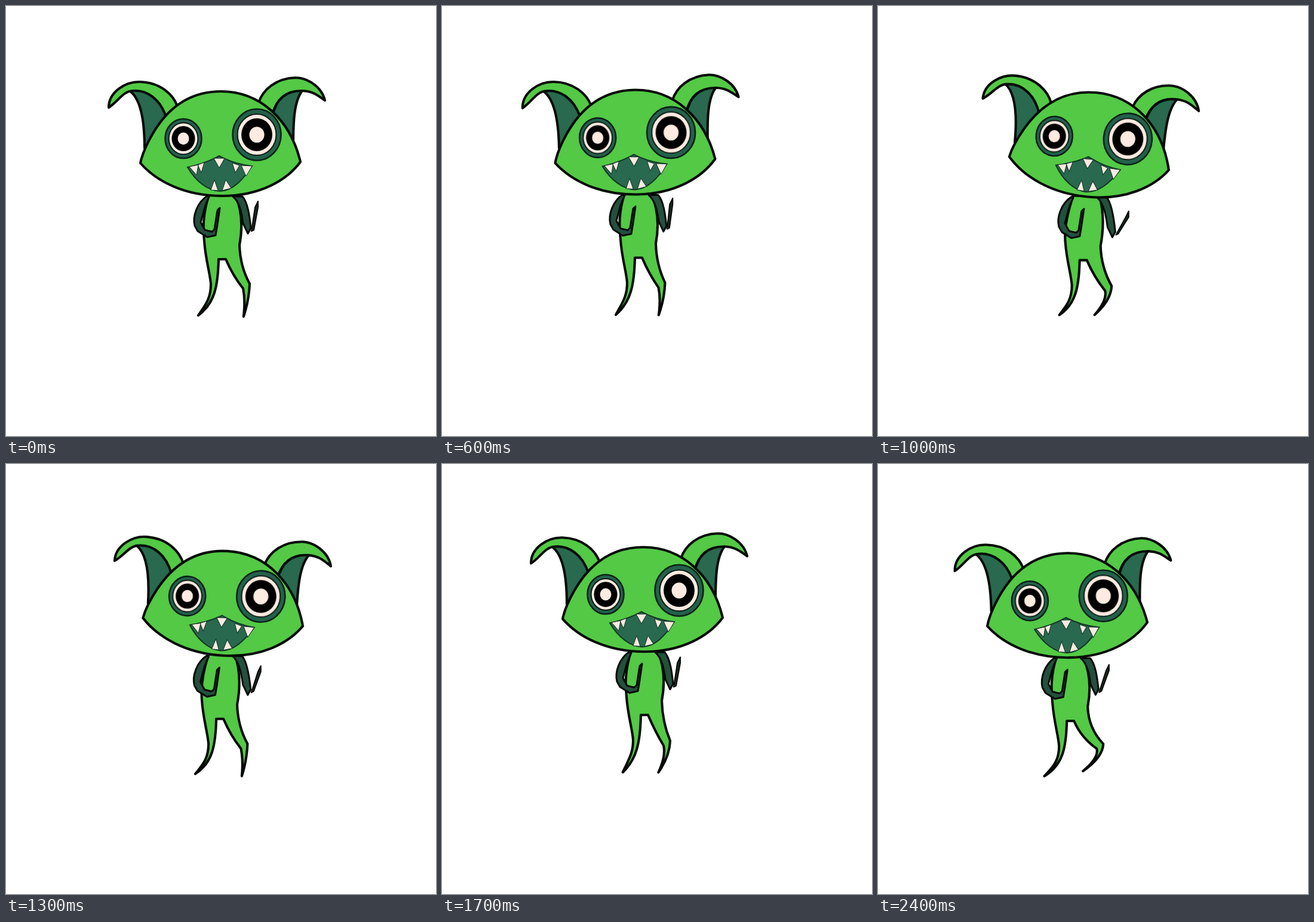
Recreate the animation shown at these times as an HTML page. Size 720 by 720 pixels, loop 2500 ms.

```html
<!DOCTYPE html>
<html>
<head>
<meta charset="utf-8">
<style>
  html, body { margin: 0; width: 100%; height: 100%; overflow: hidden; background: #fff; }
  svg { display: block; width: 100vw; height: 100vh; }
  .green { fill: #53c945; }
  .dark { fill: #28694f; }
  .arm { fill: #23503d; stroke-width: 3; }
  .pale { fill: #fdeae1; }
  .line { stroke: #060a07; stroke-width: 4.1; stroke-linejoin: round; }
</style>
</head>
<body>
<svg viewBox="0 0 720 720">
  <defs><filter id="soft"><feGaussianBlur stdDeviation="0.7"/></filter></defs>
  <g id="body" class="line">
    <path id="trunk" class="green"/>
    <path id="rightArm" class="arm"/>
    <path id="blade" fill="#1b2a20" stroke-width="2"/>
    <path id="leftArm" class="arm" d="M-25-106C-42-95-50-72-46-56L-41-47-25-37-11-40-8-58-4-86-8-82-13-50-17-46-29-49-36-62C-32-75-30-90-22-104Z"/>
  </g>
  <g id="head">
    <g class="line">
      <path class="dark" d="M207 142C224 154 232 188 232 238L272 190 262 165 225 136Z"/>
      <path class="green" d="M172 170C172 144 200 126 225 127C258 128 280 148 287 168L268 186C258 155 235 140 212 142C195 143 188 160 172 170Z"/>
      <path class="dark" d="M496 142C482 160 481 195 481 232L444 186 455 160 480 136Z"/>
      <path class="green" d="M534 158C528 133 502 120 485 120C452 121 430 140 423 162L446 182C452 158 467 141 497 142C515 143 522 150 534 158Z"/>
      <path class="green" d="M225 263C228 248 234 234 245 215C272 168 310 143 360 143C425 143 476 190 493 261C470 292 425 318 362 318C300 318 252 294 225 263Z"/>
    </g>
    <g id="eyes"></g>
    <path class="dark" stroke="#123526" stroke-width="2" d="M304 270Q333 264 357 251Q383 265 412 268C396 292 380 309 358 310C338 309 318 294 304 270Z"/>
    <path class="pale" stroke="#123526" stroke-width="1" d="M307 269L322 266 319 283ZM321 266L332 262 327 279ZM348 255L366 255 357 271ZM379 263L391 267 384 279ZM394 267L412 268 402 285ZM343 308L355 309 349 291ZM362 309L377 305 368 291Z"/>
  </g>
</svg>
<script>
const { sin, cos, min, max, exp, PI } = Math;
const el = id => document.getElementById(id);
const place = (id, value) => el(id).setAttribute('transform', value);
const shape = (id, d) => el(id).setAttribute('d', d);

function eye(x, y, rx, ry) {
  const ring = (k, attrs) => `<ellipse cx="${x}" cy="${y}" rx="${rx * k}" ry="${ry * k}" ${attrs}/>`;
  return ring(1, 'fill="#23614b" stroke="#0a2018" stroke-width="2.6"') + '<g filter="url(#soft)">' +
    ring(.8, 'class="pale" stroke="#0a1812" stroke-width="2"') +
    ring(.64, 'fill="#000"') + ring(.31, 'class="pale"') + '</g>';
}
el('eyes').innerHTML = eye(297, 222, 30.5, 33) + eye(420, 215.5, 40.5, 43);

function smooth(k, from, to) {
  const u = min(1, max(0, (k - from) / (to - from)));
  return u * u * (3 - 2 * u);
}

function draw(step) {
  // the sway repeats every 15 steps, a little further left each time
  const cycle = Math.floor(step / 15), k = step % 15;
  const a = 2 * PI * k / 15, s = sin(a);

  // slow tilt to the left, then a snap to the right that settles
  const tilt = k < 10 ? -1.1 * sin(PI * max(0, k - 2) / 10) : 5.2 * (1 - ((k - 10) / 5) ** 2);
  const lift = exp(-((k - 9) ** 2));
  const x = -12 * cycle - 5.5 * min(k, 7) + 35.5 * smooth(k, 7, 12.5) - 9 * smooth(k, 12.5, 15);
  const y = cycle + k / 15 - 6.5 * s - .9 * tilt;

  // limb ends, measured from the hip
  const left = [-40 + 5 * s + .8 * tilt, 94 + 2.5 * s];
  const right = [28.5 + 8 * cos(2 * a - 5.28) + 3 * cos(a), 96 - 12 * lift];
  const knee = [46 - 4 * s + 6 * lift - .8 * tilt, 41 + 3 * s + .9 * tilt];
  const elbow = [43 + 1.1 * tilt, -43 + .9 * tilt];
  const hand = [60 + 2.6 * tilt + 7 * lift, -97 + 2.5 * tilt + 5 * lift];
  const off = (p, dx, dy) => [p[0] + dx, p[1] + dy];

  place('head', `translate(${x + 3.2 * tilt} ${y}) rotate(${tilt} 358.5 218.5)`);
  place('body', `translate(${362 + x} ${424 + y})`);
  place('leftArm', `translate(${tilt})`);

  const shin = (knee[1] + right[1]) / 2;
  shape('trunk', `M${tilt - 22} -108C${tilt - 33} -75 -32 -50 -30 -30
    C-28 0 -20 25 -19 42C-19 65 -27 75 ${left}C-13 74 -7 46 -6 0L6 0
    Q18 28 ${off(knee, -11, 8)}Q${knee[0] - 7} ${shin} ${right}
    Q${knee[0] - 1} ${shin} ${knee}Q30 12 29 -24C33 -45 36 -75 ${tilt + 22} -108Z`);
  shape('rightArm', `M${tilt + 34} -105C${tilt + 43} -95 ${off(elbow, 3, -28)} ${off(elbow, 5, -9)}
    L${elbow}L${off(elbow, -8, -17)}C${off(elbow, -10, -32)} ${tilt + 30} -95 ${tilt + 18} -105Z`);
  shape('blade', `M${off(elbow, 6, -4)}L${off(hand, -5, 10)} ${hand} ${off(hand, 0, 10)} ${off(elbow, 10, -6)}Z`);
}

function tick() {
  draw(Math.floor(performance.now() % 2500 / 100));
  requestAnimationFrame(tick);
}
tick();
</script>
</body>
</html>
```
